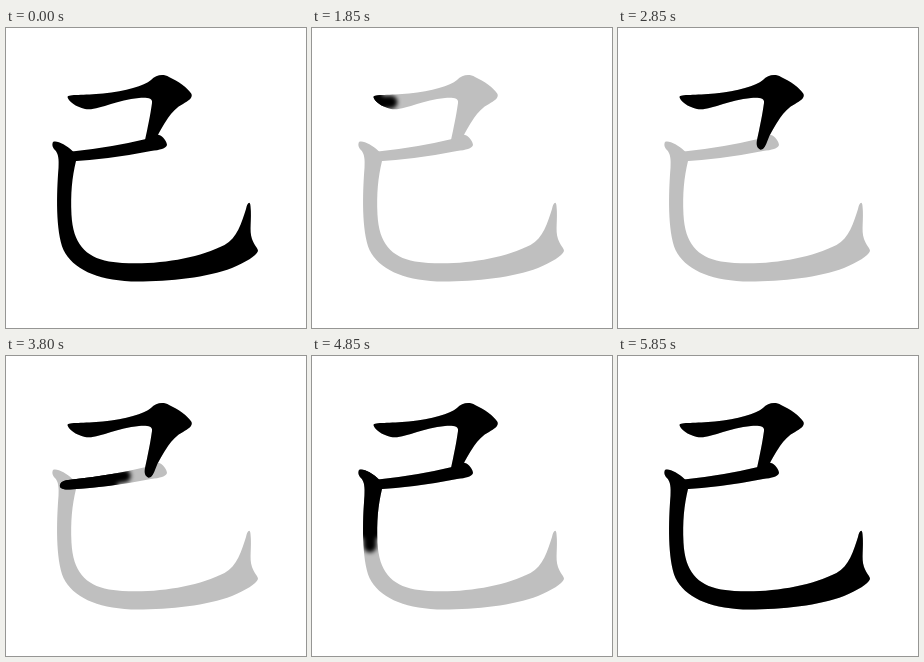
These frames come from a looping animation (300 by 300 pixels, 6.85 s). An HTML page with a canvas:

```html
<!DOCTYPE html>
<html lang="en">
<head>
<meta charset="utf-8">
<title>Stroke order</title>
<style>
html, body { margin: 0; width: 100%; height: 100%; overflow: hidden; background: #fff; }
canvas { display: block; width: 300px; height: 300px; }
</style>
</head>
<body>
<canvas id="stage" width="300" height="300"></canvas>
<script>
const LOOP = 6850, INTRO = 1000, STEP = 100;
const INK = '#000', GHOST = '#bfbfbf';
const ctx = document.getElementById('stage').getContext('2d');

// Each run: start time, number of steps, brush travel from and to (px along the spine).
const strokes = [
  {
    shape: `M61.500 69C62 66 78 67.500 97 65.500C120 63 138 58 145 52C150 47 157 45.500 163 49
      C172 53 182 60 185.500 66C187 70 182 73 177 76C171 79 166 84 162 90C157 98 152 105 149 114
      C147 120 144 122.500 142 121.500C139 120 138 117 139 112C141.500 101 144.500 86 146 75
      C147 70 141 69.500 133 70C122 71 113 73.500 105 76C95 79 86 82.500 79 81C70 79 62 73 61.500 69Z`,
    spine: 'M45 76L80 74Q120 69 150 58Q174 52 170 68Q156 84 140 140',
    runs: [[1750, 2, 16, 38], [2000, 6, 38, 147], [2650, 3, 147, 195]]
  },
  {
    shape: `M54 129C55 124.500 61 124 66 123.500Q105 119.500 140 111C145 110 149 106 153 107
      C157 108 161 114 161 117C160 120.500 154 122 145 123Q105 131 64 133.500C57 134 53 132 54 129Z`,
    spine: 'M36 132L172 112',
    runs: [[3350, 2, 17, 32], [3600, 5, 32, 124]]
  },
  {
    shape: `M47 114C51 112 60 117 66.500 123L70 126L70 133C66 150 64.500 165 65.500 187C67 215 79 229 103 233.500
      C140 239 189 232 218.500 217C231 210 235.500 195 240 181C241 175.500 244 172 244.500 178
      C246 192 243 202 246 211C248 217 252 220 252 223C250 228 240 234 226 240C200 250 160 254 125 253.500
      C90 251.500 67 241 57.500 222C49.500 203 50.500 165 52.500 140C53 131 52.500 126 49 122C46 119 46 116 47 114Z`,
    spine: 'M54 98Q62 125 59 150C57 185 56 215 70 230C90 250 165 248 200 239Q245 228 244 205L243 160',
    runs: [[4500, 2, 15, 35], [4750, 7, 35, 250], [5450, 2, 250, 321], [5750, 2, 321, 370]]
  }
].map(s => ({ ...s, shape: new Path2D(s.shape), spine: new Path2D(s.spine) }));

// Brush travel at time t; Infinity once the stroke is finished.
function travel(runs, t) {
  let reach = 0;
  runs.forEach(([start, count, from, to], i) => {
    if (t < start) return;
    const done = Math.min(count, Math.floor((t - start) / STEP) + 1);
    const last = i === runs.length - 1 && done === count;
    reach = last ? Infinity : from + (to - from) * done / count;
  });
  return reach;
}

function brush(spine, reach, width, cap) {
  ctx.lineWidth = width;
  ctx.lineCap = cap;
  ctx.setLineDash([Math.max(0.1, reach), 2000]);
  ctx.stroke(spine);
}

function paint({ shape, spine }, reach) {
  ctx.fillStyle = ctx.strokeStyle = INK;
  if (reach === Infinity) return ctx.fill(shape);
  if (!reach) return;
  ctx.save();
  ctx.clip(shape);
  ctx.filter = 'blur(2px)';
  ctx.lineJoin = 'round';
  brush(spine, reach - 12, 38, 'butt');
  brush(spine, reach - 4, 13, 'round');
  ctx.restore();
}

function draw(t) {
  ctx.fillStyle = '#fff';
  ctx.fillRect(0, 0, 300, 300);
  ctx.fillStyle = GHOST;
  if (t >= INTRO) strokes.forEach(s => ctx.fill(s.shape));
  strokes.forEach(s => paint(s, t < INTRO ? Infinity : travel(s.runs, t)));
}

const begin = performance.now();
function tick() {
  draw((performance.now() - begin) % LOOP);
  requestAnimationFrame(tick);
}
tick();
</script>
</body>
</html>
```
